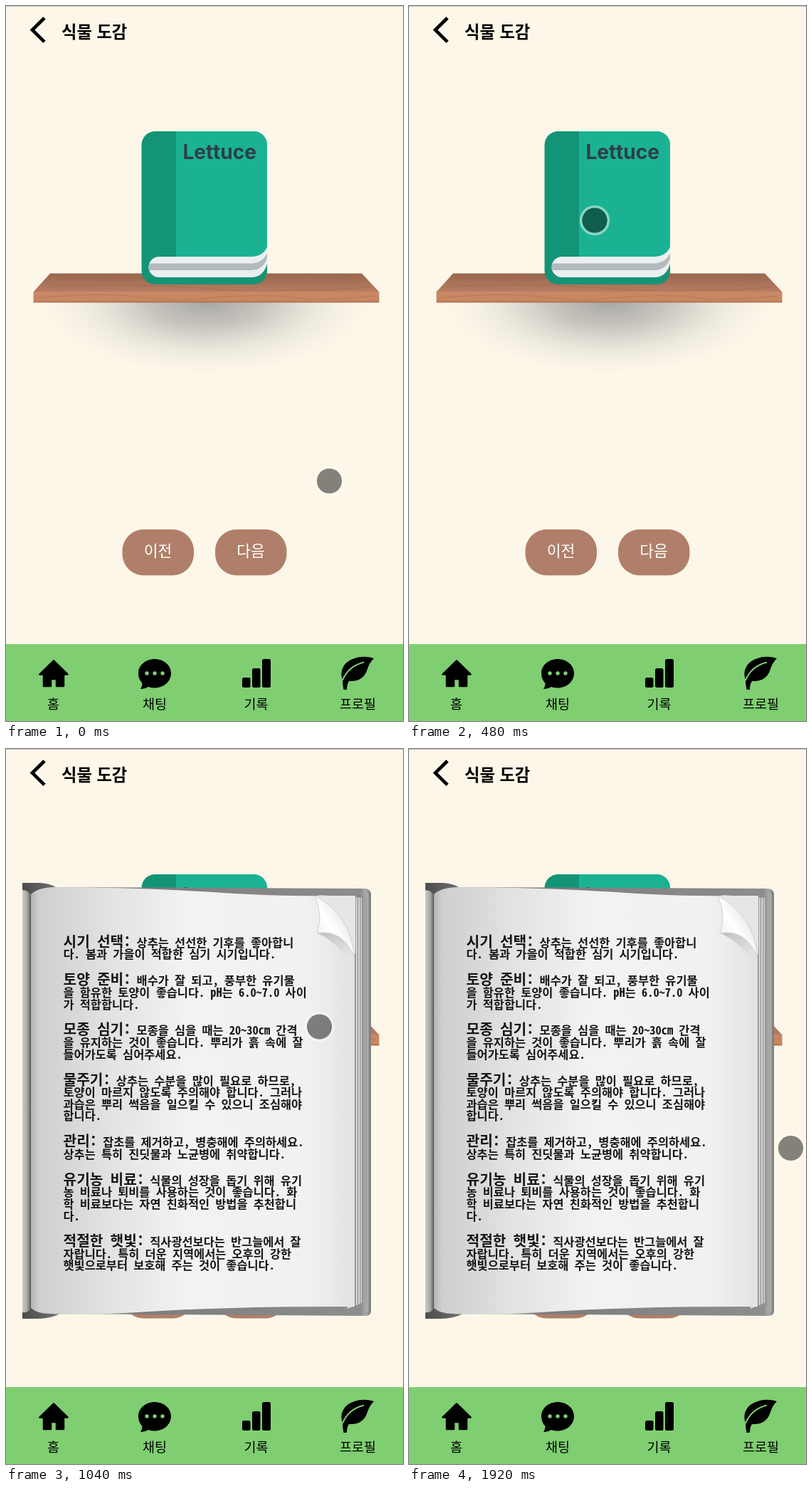
These frames come from a looping animation (558x1004 px, 2 s). An HTML page:

```html
<!DOCTYPE html>
<html lang="ko">
<head>
<meta charset="utf-8">
<style>
  html, body { margin: 0; width: 100%; height: 100%; overflow: hidden; background: #fdf7e9; }
  svg { display: block; width: 100%; height: 100%; }
  text { font-family: "Noto Sans CJK KR", "Noto Sans CJK", sans-serif; white-space: pre; }
  .middle { text-anchor: middle; font-weight: 500; }
  .page text { font: 700 16.4px "Noto Sans Mono CJK KR", "Noto Sans CJK KR", "Noto Sans CJK", monospace; fill: #161616; }
  .page .head { font-size: 20.3px; }
</style>
</head>
<body>
<svg viewBox="0 0 558 1004">
  <defs>
    <linearGradient id="wood" x2="0" y2="1">
      <stop offset="0" stop-color="#98674f"/><stop offset="1" stop-color="#b97c61"/>
    </linearGradient>
    <linearGradient id="front" x2="0" y2="1">
      <stop offset="0" stop-color="#c78867"/><stop offset=".8" stop-color="#c98660"/><stop offset="1" stop-color="#a96c4c"/>
    </linearGradient>
    <radialGradient id="shade">
      <stop offset="0" stop-color="#8f8f8f" stop-opacity=".78"/>
      <stop offset=".35" stop-color="#9b9b9a" stop-opacity=".55"/>
      <stop offset=".7" stop-color="#b5b5b4" stop-opacity=".2"/>
      <stop offset="1" stop-color="#d0d0ce" stop-opacity="0"/>
    </radialGradient>
    <linearGradient id="cover">
      <stop offset="0" stop-color="#4c4c4c"/><stop offset=".12" stop-color="#777"/>
      <stop offset=".97" stop-color="#8d8d8d"/><stop offset=".985" stop-color="#a9a9a9"/><stop offset="1" stop-color="#777"/>
    </linearGradient>
    <linearGradient id="gutter">
      <stop offset="0" stop-color="#c9c9c9"/><stop offset=".6" stop-color="#aaa"/><stop offset="1" stop-color="#6d6d6d"/>
    </linearGradient>
    <linearGradient id="paper">
      <stop offset="0" stop-color="#b4b4b4"/><stop offset=".025" stop-color="#cfcfcf"/>
      <stop offset=".12" stop-color="#d7d7d7"/><stop offset=".25" stop-color="#e3e3e3"/>
      <stop offset=".48" stop-color="#f2f2f2"/><stop offset=".85" stop-color="#f1f1f1"/><stop offset="1" stop-color="#e2e2e2"/>
    </linearGradient>
    <linearGradient id="flap" x1="0" y1="1" x2="1" y2="0">
      <stop offset="0" stop-color="#e4e4e4"/><stop offset=".45" stop-color="#fff"/><stop offset="1" stop-color="#cfcfcf"/>
    </linearGradient>
    <linearGradient id="fold" x2=".75" y2="1">
      <stop offset=".1" stop-color="#999" stop-opacity=".5"/><stop offset=".8" stop-color="#999" stop-opacity="0"/>
    </linearGradient>
    <clipPath id="below"><path d="M0 416H558V540H0Z"/></clipPath>
  </defs>

  <path d="M0 .5H558" stroke="#c4c0b7"/>
  <path d="M54 16.8 37 33.6 54 50.4" fill="none" stroke="#000" stroke-width="4.8"/>
  <text x="78" y="44.800" font-size="23.300" font-weight="700">식물 도감</text>

  <!-- shelf -->
  <ellipse cx="281" cy="414" rx="232" ry="104" fill="url(#shade)" clip-path="url(#below)"/>
  <path d="M62 375.5H500L524.5 401.5H38.5Z" fill="url(#wood)"/>
  <path d="M38.5 401H524.5V416.5H38.5Z" fill="url(#front)"/>
  <path d="M70 384Q180 378 290 386T490 383M55 394Q160 388 270 396T512 395M45 410Q130 402 180 408T260 412Q360 403 400 409T520 407"
        fill="none" stroke="#8f553b" stroke-opacity=".25" stroke-width="1.2"/>

  <!-- closed book -->
  <rect x="190.5" y="176" width="176.5" height="215" rx="19" fill="#149476"/>
  <path d="M239 176H348A19 19 0 0 1 367 195V352H239Z" fill="#1bb294"/>
  <path d="M215 352H346Q362 351 367 338V362Q362 380 346 381H215A14.5 14.5 0 0 1 215 352Z" fill="#ebeff0"/>
  <path d="M201 371Q199.5 366 202 361.5H346Q361 360 367 347V355Q361 370 346 371Z" fill="#b2babd"/>
  <text x="248.5" y="214.5" font-size="28" font-weight="700" fill="#2d3e49" style="font-family:Inter,sans-serif">Lettuce</text>

  <!-- buttons -->
  <g fill="#b07f69">
    <rect x="163.5" y="735" width="100.5" height="64.5" rx="30"/>
    <rect x="294" y="735" width="100.5" height="64.5" rx="30"/>
  </g>
  <g class="middle" font-size="21.5" fill="#fff">
    <text x="213.5" y="773">이전</text><text x="344" y="773">다음</text>
  </g>

  <!-- open book -->
  <g id="book">
    <path d="M23 188H48Q62 189 70 194L505 196Q513 197 513 204V789Q513 796 505 796L76 793Q62 800 45 800H23Z" fill="url(#cover)"/>
    <path d="M508.5 202V791" stroke="#b5b5b5" stroke-width="1.5"/>
    <path d="M23 198Q30 198 34 204V787Q30 792 23 791Z" fill="url(#gutter)"/>
    <path d="M440 205 500 209V778L480 786Z" fill="#d9d9d9"/>
    <path d="M494.5 208V781M498 209V780" stroke="#898989" stroke-width="1.2"/>
    <path d="M35 204Q44 195 66 194Q190 194 320 203Q390 207 491 206.5V783Q330 782 200 790Q110 796 62 793Q44 793 35 785Z" fill="url(#paper)"/>
    <path d="M491 206.5V783" stroke="#777" stroke-width="1.3"/>
    <path d="M437 258Q472 254 490 282V308Q470 274 437 258Z" fill="url(#fold)"/>
    <path d="M434 206H491V290Q478 232 434 206Z" fill="#e6e6e6"/>
    <path d="M434 206Q446 232 437 259Q472 252 490 292Q484 232 434 206Z" fill="url(#flap)" stroke="#bbb" stroke-width=".6"/>
    <g id="guide" class="page"></g>
  </g>

  <!-- navigation -->
  <path d="M0 896H558V1004H0Z" fill="#7fce71"/>
  <path d="M67 919.5 86.500 938.5H81V955H71V945H63V955H53V938.5H47.500Z" stroke="#000" stroke-width="2.5" stroke-linejoin="round"/>
  <path d="M209 917C222 917 232 926 232 937S222 957.5 209 957.5Q204 957.5 200 956Q195 959.5 189 959Q192 955 191.5 951Q186 945 186 937C186 926 196 917 209 917Z"/>
  <g fill="#7fce71"><circle cx="198" cy="937" r="2.7"/><circle cx="209" cy="937" r="2.7"/><circle cx="220" cy="937" r="2.7"/></g>
  <rect x="332" y="943" width="11.5" height="14" rx="2.5"/>
  <rect x="346" y="930" width="11.5" height="27" rx="2.5"/>
  <rect x="360" y="917" width="12" height="40" rx="2.5"/>
  <path d="M517 916C508 913 498 913 490 916C475 920 468 934 473 946Q473 953 474.500 960H479Q479 953 482 948C498 949 505 941 508 931Q511 922 517 916Z"/>
  <path d="M473 947Q481 927 503 921.5" fill="none" stroke="#7fce71" stroke-width="2"/>
  <g class="middle" font-size="18.5">
    <text x="66.5" y="987">홈</text><text x="209" y="987">채팅</text>
    <text x="351.5" y="987">기록</text><text x="494.5" y="987">프로필</text>
  </g>

  <g id="pointer">
    <circle r="19.3" fill="none" stroke="#fffaf0" stroke-opacity=".48" stroke-width="3.6"/>
    <circle r="17.6" fill="#000" fill-opacity=".48"/>
  </g>
</svg>
<script>
  const paragraphs = [
    ["시기 선택:", " 상추는 선선한 기후를 좋아합니", "다. 봄과 가을이 적합한 심기 시기입니다."],
    ["토양 준비:", " 배수가 잘 되고, 풍부한 유기물", "을 함유한 토양이 좋습니다. pH는 6.0~7.0 사이", "가 적합합니다."],
    ["모종 심기:", " 모종을 심을 때는 20~30cm 간격", "을 유지하는 것이 좋습니다. 뿌리가 흙 속에 잘", "들어가도록 심어주세요."],
    ["물주기:", " 상추는 수분을 많이 필요로 하므로,", "토양이 마르지 않도록 주의해야 합니다. 그러나", "과습은 뿌리 썩음을 일으킬 수 있으니 조심해야", "합니다."],
    ["관리:", " 잡초를 제거하고, 병충해에 주의하세요.", "상추는 특히 진딧물과 노균병에 취약합니다."],
    ["유기농 비료:", " 식물의 성장을 돕기 위해 유기", "농 비료나 퇴비를 사용하는 것이 좋습니다. 화", "학 비료보다는 자연 친화적인 방법을 추천합니", "다."],
    ["적절한 햇빛:", " 직사광선보다는 반그늘에서 잘", "자랍니다. 특히 더운 지역에서는 오후의 강한", "햇빛으로부터 보호해 주는 것이 좋습니다."],
  ];
  let baseline = 277.5, markup = "";
  for (const [head, ...lines] of paragraphs) {
    lines.forEach((line, i) => {
      const title = i ? "" : `<tspan class="head">${head}</tspan>`;
      markup += `<text x="80.5" y="${baseline + i * 16.6}">${title}${line}</text>`;
    });
    baseline += lines.length * 16.3 + 21.2;
  }
  document.getElementById("guide").innerHTML = markup;

  // [time, x, y] along the pointer's path
  const path = [
    [0, 454.5, 667], [80, 394, 538], [160, 323.5, 413], [240, 285, 346], [320, 267, 313],
    [400, 262, 303], [480, 261, 301], [800, 261, 301], [880, 288, 309], [960, 368, 340],
    [1040, 440.5, 390], [1120, 480, 449], [1200, 504, 510], [1280, 515, 555], [1360, 518, 574],
    [1520, 525, 571], [1680, 532, 565], [1840, 536, 561], [1920, 536.5, 560.5],
  ];
  const book = document.getElementById("book");
  const pointer = document.getElementById("pointer");

  function position(time) {
    const next = path.findIndex(point => point[0] > time);
    if (next < 0) return path.at(-1).slice(1);
    const [a, b] = [path[next - 1], path[next]];
    const k = (time - a[0]) / (b[0] - a[0]);
    return [1, 2].map(i => a[i] + (b[i] - a[i]) * k);
  }

  function draw() {
    const time = Math.floor(performance.now() % 2000 / 80) * 80;
    book.setAttribute("visibility", time >= 560 ? "visible" : "hidden");
    pointer.setAttribute("transform", `translate(${position(time)})`);
    requestAnimationFrame(draw);
  }
  draw();
</script>
</body>
</html>
```
